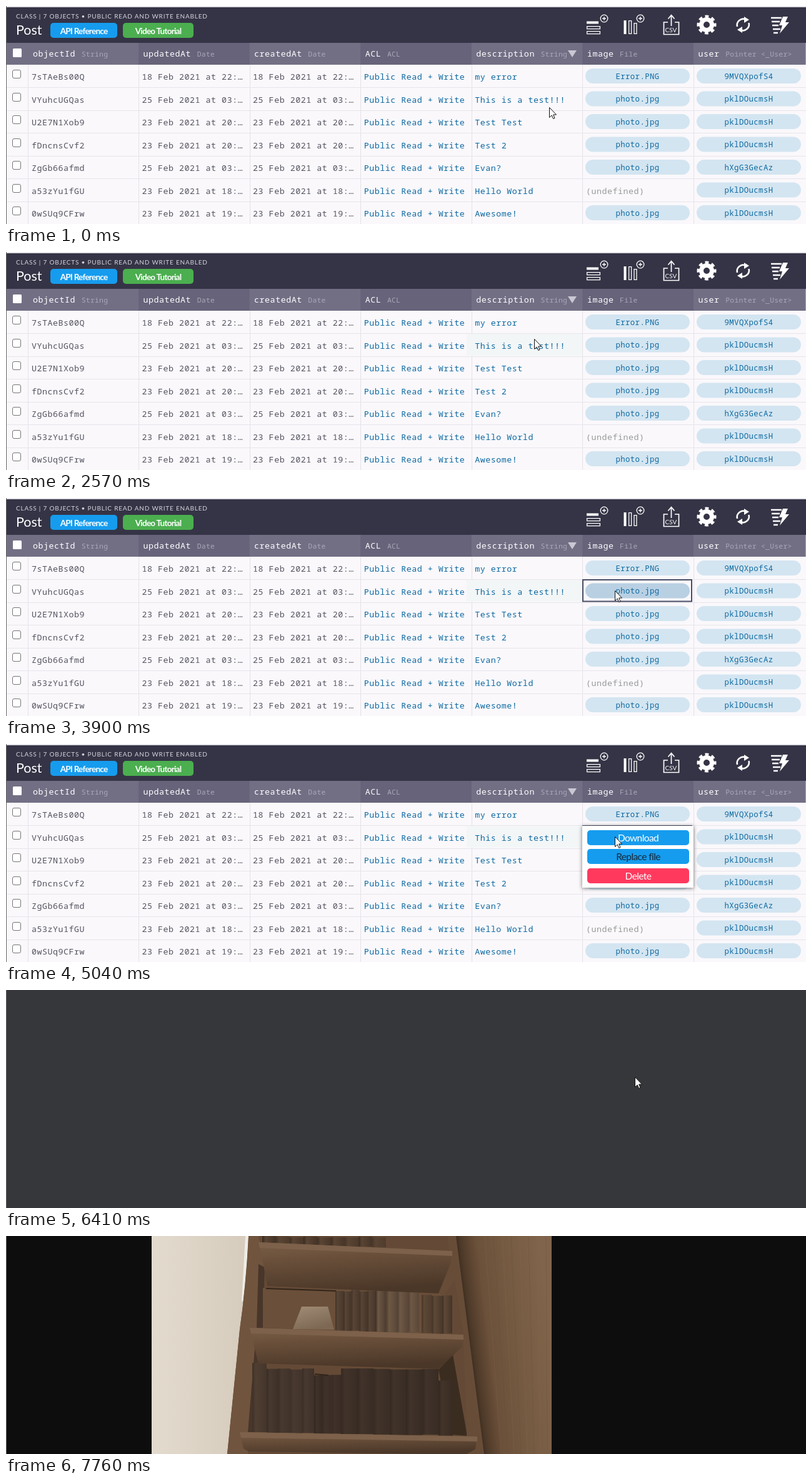
Recreate the animation shown at these times as an HTML page. Size 1280 by 349 pixels, loop 8000 ms.

```html
<!DOCTYPE html>
<html lang="en">
<head>
<meta charset="utf-8">
<title>Data browser</title>
<style>
html, body { margin: 0; width: 100%; height: 100%; overflow: hidden; background: #faf8fb; }
svg { display: block; width: 1280px; height: 349px; }
text { font-family: "Noto Sans Mono", monospace; font-size: 13.3px; letter-spacing: .53px; white-space: pre; }
.head { fill: #fff; font-weight: 500; }
.type { fill: #aaa7b9; font-size: 11.4px; letter-spacing: .26px; }
.cell { fill: #55535f; }
.link { fill: #0e69a1; }
.none { fill: #999; }
.pill { fill: #0e69a1; font-size: 12.3px; letter-spacing: .42px; text-anchor: middle; }
.ui { font-family: Lato, sans-serif; fill: #fff; }
.crumb { font-size: 10px; letter-spacing: .8px; fill: #d6d5de; }
.title { font-size: 21.5px; letter-spacing: 0; }
.csv { font-size: 10px; letter-spacing: 0; }
.button { font-size: 13.5px; font-weight: 700; letter-spacing: -.75px; text-anchor: middle; }
.item { font-size: 15.5px; letter-spacing: -.6px; text-anchor: middle; }
.dark { fill: #16283a; }
</style>
</head>
<body>
<svg id="stage" viewBox="0 0 1280 349"></svg>
<script>
const LOOP = 8000;
const columns = ['objectId String', 'updatedAt Date', 'createdAt Date', 'ACL ACL',
  'description String', 'image File', 'user Pointer &lt;_User>'];
const rows = [
  ['7sTAeBs00Q', '18 Feb 2021 at 22:…', 'my error', 'Error.PNG', '9MVQXpofS4'],
  ['VYuhcUGQas', '25 Feb 2021 at 03:…', 'This is a test!!!', 'photo.jpg', 'pklDOucmsH'],
  ['U2E7N1Xob9', '23 Feb 2021 at 20:…', 'Test Test', 'photo.jpg', 'pklDOucmsH'],
  ['fDncnsCvf2', '23 Feb 2021 at 20:…', 'Test 2', 'photo.jpg', 'pklDOucmsH'],
  ['ZgGb66afmd', '25 Feb 2021 at 03:…', 'Evan?', 'photo.jpg', 'hXgG3GecAz'],
  ['a53zYu1fGU', '23 Feb 2021 at 18:…', 'Hello World', '', 'pklDOucmsH'],
  ['0wSUq9CFrw', '23 Feb 2021 at 19:…', 'Awesome!', 'photo.jpg', 'pklDOucmsH']
];

const rect = (x, y, w, h, fill, extra = '') =>
  `<rect x="${x}" y="${y}" width="${w}" height="${h}" fill="${fill}" ${extra}/>`;
const text = (x, y, cls, str) => `<text x="${x}" y="${y}" class="${cls}">${str}</text>`;
const shape = (d, fill, extra = '') => `<path d="${d}" fill="${fill}" ${extra}/>`;
const repeat = (count, make) => Array.from({ length: count }, (_, i) => make(i)).join('');
const gradient = (id, direction, ...colors) => `<linearGradient id="${id}" ${direction}>` +
  colors.map((color, i) => `<stop offset="${(i / (colors.length - 1)) ** 2}" stop-color="${color}"/>`).join('') +
  '</linearGradient>';

const columnX = i => i ? 212 + 177.6 * (i - 1) : 0;
const pill = (x, y, label, id = '') =>
  rect(x, y - 12, 167, 24, '#d3e5f1', `rx="12" ${id}`) + text(x + 83.5, y + 4.5, 'pill', label);
const button = (x, y, w, fill, label, cls, base) =>
  rect(x, y, w, 24, fill, 'rx="5"') + text(x + w / 2, y + base, 'ui ' + cls, label);

function toolbar() {
  const plus = (x, y) => `<circle cx="${x}" cy="${y}" r="5.8"/><path d="M${x - 3} ${y}h6m-3-3v6"/>`;
  return rect(0, 0, 1280, 2, '#e4e3e8') + rect(0, 2, 1280, 57, '#353446') +
    text(16, 20, 'ui crumb', 'CLASS | 7 OBJECTS • PUBLIC READ AND WRITE ENABLED') +
    text(16, 46, 'ui title', 'Post') +
    button(71, 27, 107, '#169cee', 'API Reference', 'button', 17.5) +
    button(187, 27, 113, '#4bae4f', 'Video Tutorial', 'button', 17.5) +
    `<g fill="none" stroke="#fff" stroke-width="1.3">
      <path d="M929 26.5h19M990.5 23v22" stroke-width="4"/>
      <path d="M929.6 32.6h20.8v4h-20.8zm0 8h20.8v4h-20.8z"/>${plus(957, 20)}
      <path d="M996.6 23.6h4v20.8h-4zM1005 27.6h4v16.8h-4z"/>${plus(1015, 20)}
      <path d="M1059 26h-6.5v19.5h24V26h-6.5M1064.5 32V15m-5 5.5l5-6 5 6" stroke-width="1.7"/>
      <circle cx="1121" cy="30" r="8.5" stroke-width="7"/>
      <circle cx="1121" cy="30" r="13" stroke-width="5" stroke-dasharray="5.6 4.61" stroke-dashoffset="2.8"/>
      <path d="M1170 33a9.7 9.7 0 0 1 14-11M1188.5 27a9.7 9.7 0 0 1-14 11M1224 19h17m-16 6h13m-12 6h10m-9 6h12m-11 6h7"
        stroke-width="2.6"/>
    </g>` +
    shape('M1181 17l8 5-8 5zM1178 33l-8 5 8 5zM1243 17h8l-4 9h6l-15 18 4-13h-5z', '#fff') +
    text(1054.5, 42, 'ui csv', 'CSV');
}

function table() {
  let out = '';
  columns.forEach((column, i) => {
    const [label, ...type] = column.split(' ');
    const x = columnX(i), labelX = i ? x + 7.5 : 43;
    out += rect(x, 59, columnX(i + 1) - x + 2, 35, i % 2 ? '#66637a' : '#726f85') +
      text(labelX, 81, 'head', label) +
      text(labelX + label.length * 8.5 + 9.7, 80.5, 'type', type.join(' ')) +
      rect(i ? Math.round(x) : 35, 94, 1, 255, '#e5e2e9');
  });
  out += rect(11, 68, 14, 14, '#fff', 'rx="1.5"') + shape('M899 71h14l-7 11z', '#c9c7d2') +
    rect(737, 130, 185, 36, '#f3f6f7', 'id="tint"');
  rows.forEach(([id, date, description, file, user], i) => {
    const y = 112 + 36.5 * i;
    const cells = [['cell', id], ['cell', date], ['cell', date], ['link', 'Public Read + Write'],
      ['link', description], ['none', file ? '' : '(undefined)']];
    out += rect(0, Math.round(y + 18), 1280, 1, '#e8e5eb') +
      rect(10.5, Math.round(y - 10) + .5, 13, 13, '#fff', 'rx="2.5" stroke="#767676"') +
      cells.map(([cls, str], c) => text(c ? columnX(c) + 5.5 : 41, y + 6.3, cls, str)).join('') +
      (file && pill(927, y, file, i === 1 ? 'id="hovered"' : '')) + pill(1105, y, user);
  });
  return out;
}

const menu = () => '<g id="menu">' +
  rect(922, 131, 178, 99, '#fff', 'style="filter:drop-shadow(0 1px 3px #0008)"') +
  button(930, 138, 163, '#169cee', 'Download', 'item', 17.5) +
  button(930, 168, 163, '#169cee', 'Replace file', 'item dark', 17.5) +
  button(930, 199, 163, '#ff395e', 'Delete', 'item', 17.5) + '</g>';

let seed = 7;
const random = () => (seed = seed * 16807 % 2147483647) / 2147483647;

// A run of books between two x positions, with uneven tops and shades
function books(from, to, count, top, bottom, fill) {
  const width = (to - from) / count;
  return repeat(count, i => {
    const box = [from + i * width, top + random() * 3, width, bottom - top];
    return rect(...box, fill) + rect(...box, 'url(#spine)', `opacity="${.3 + random() * .5}"`);
  });
}

const shelf = (x1, y1, x2, y2, depth, inset) =>
  shape(`M${x1} ${y1}L${x2} ${y2}l-3 20L${x2 - inset} ${y2 + depth}L${x1 + 14} ${y1 + depth + 2}l-8-${depth - 24}z`,
    'url(#board)') + shape(`M${x1} ${y1}L${x2} ${y2}v8L${x1 + 2} ${y1 + 9}z`, '#7d614a');

function photo() {
  return '<g id="photo">' + rect(0, 0, 1280, 349, '#0d0d0d') + rect(233, 0, 640, 349, '#644a36') +
    shape('M233 0H388Q384 80 374 150L354 349H233z', 'url(#wall)') +
    shape('M383 0h5Q386 50 379 105h-2z', '#efece6') +
    shape('M388 0H404L413 45 404 150 387 349H354L374 150Q384 80 388 0z', '#70543e') +
    shape('M404 45l10 5-3 97h-10zM398 180l6 20-10 114h-7z', '#49362a') +
    shape('M411 83L700 90l14 67-303-10z', '#6a4f3a') +
    shape('M692 214l23-24 23 130-26-2z', '#3b2c20') +
    books(410, 608, 9, 0, 16, '#5a4433') +
    books(527, 591, 5, 86, 151, '#594536') + books(591, 661, 4, 74, 153, '#6e5845') +
    books(665, 714, 3, 93, 154, '#5e4836') +
    books(394, 417, 1, 203, 314, '#4f3e32') + books(417, 493, 4, 211, 314, '#483930') +
    books(493, 536, 3, 221, 315, '#40322a') + books(536, 692, 6, 211, 316, '#41332a') +
    books(692, 715, 1, 230, 318, '#433429') +
    '<path d="M416 84l112 4M494 221l22 2" stroke="#30241a" stroke-width="2"/>' +
    shape('M473 113h42l10 37-66-1z', 'url(#lamp)') +
    shape('M692 92L712 46 706 0H720L765 349H738L732 158 718 70 700 96z', '#674d38') +
    shelf(404, 10, 714, 24, 68, 22) + shelf(390, 147, 732, 158, 55, 40) + shelf(374, 314, 754, 321, 29, 18) +
    shape('M720 0H873V349H765z', 'url(#panel)') +
    repeat(9, i => `<path d="M${752 + 14 * i} 0L${782 + 10.5 * i} 349" stroke="${i % 2 ? '#8d6e52' : '#634932'}" opacity=".25"/>`) +
    '</g>';
}

const stage = document.getElementById('stage');
stage.innerHTML = '<defs>' +
  gradient('wall', '', '#e3dbce', '#d6cbbc') +
  gradient('lamp', 'x2=".5" y2="1"', '#a18d77', '#7d6853') +
  gradient('spine', '', '#2a2019', '#2a201900', '#2a2019aa') +
  gradient('board', 'x2=".25" y2="1"', '#795d46', '#6f543e', '#4b3728') +
  gradient('panel', 'gradientUnits="userSpaceOnUse" x1="740" y1="180" x2="873" y2="163"',
    '#37291d', '#4d3928', '#6b503a', '#755a42', '#80644b') + '</defs>' +
  rect(0, 0, 1280, 349, '#faf8fb') + table() + toolbar() +
  rect(923, 131, 174, 34.5, 'none', 'id="selection" stroke="#4a4d66" stroke-width="2"') + menu() +
  rect(0, 0, 1280, 349, '#36373a', 'id="blank"') + photo() + rect(0, 0, 1, 349, '#666') +
  shape('M.5 .5V16.5L4.2 13 6.7 18.5 9 17.5 6.700 12H11.500Z', '#fff', 'id="cursor" stroke="#111"');

// Each move goes to a point in equal steps; bend swings the path sideways
const moves = [
  { start: 150, end: 1150, steps: 8, to: [850, 120], bend: [-122, 34] },
  { start: 1300, end: 2150, steps: 7, to: [774, 148], bend: [85, 20] },
  { start: 2570, end: 3000, steps: 4, to: [966, 142], bend: [33, -7.5] },
  { start: 3320, end: 3470, steps: 2, to: [974, 148], bend: [0, 0] },
  { start: 5330, end: 5570, steps: 3, to: [1006, 139], bend: [38, 6] },
  { start: 6680, end: 7250, steps: 5, to: [575, 130], bend: [0, 0] },
  { start: 7370, end: 7630, steps: 3, to: [592, 306], bend: [-12, 0] }
];

function pointer(t) {
  let position = [869, 162];
  for (const { start, end, steps, to, bend } of moves) {
    if (t < start) break;
    const step = 1 + Math.floor((t - start) / (end - start) * (steps - 1) + 1e-6);
    const u = Math.min(1, step / steps);
    position = position.map((from, axis) =>
      Math.round(from + (to[axis] - from) * u + bend[axis] * Math.sin(Math.PI * u * (axis + 1))));
  }
  return position;
}

const part = id => document.getElementById(id);
const show = (id, on) => part(id).style.display = on ? '' : 'none';

function draw(t) {
  show('tint', t >= 450);
  part('hovered').setAttribute('fill', t >= 3000 ? '#b9d0e3' : '#d3e5f1');
  show('selection', t >= 3900);
  show('menu', t >= 5040);
  show('blank', t >= 6410);
  show('photo', t >= 6560);
  show('cursor', t < 7760);
  part('cursor').setAttribute('transform', `translate(${pointer(t)})`);
}

const begin = performance.now();
function frame() {
  draw((performance.now() - begin) % LOOP);
  requestAnimationFrame(frame);
}
frame();
</script>
</body>
</html>
```
